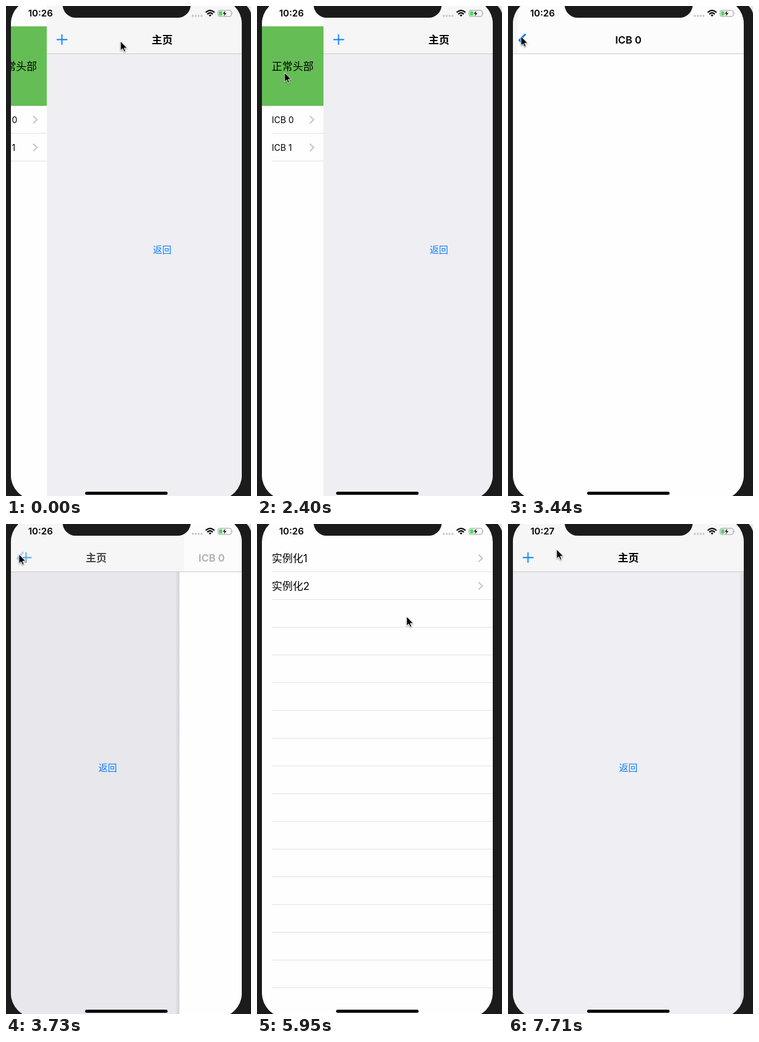
Write an HTML page that moves like this. It is 398x795 px and loops after 8000 ms.

```html
<!DOCTYPE html>
<html lang="zh-CN">
<head>
<meta charset="utf-8">
<title>Drawer navigation</title>
<style>
@property --drawer { syntax: "<number>"; inherits: true; initial-value: 0; }
@property --push { syntax: "<number>"; inherits: true; initial-value: 0; }
@property --title { syntax: "<number>"; inherits: true; initial-value: 0; }
html, body { margin: 0; width: 100%; height: 100%; overflow: hidden; background: #1b1b1b; }
svg { display: block; width: 398px; height: 795px; }
text { font: 17px Inter, "Noto Sans CJK SC", "Noto Sans CJK", sans-serif; fill: #000; }
.heading { font-weight: 600; text-anchor: middle; }
.latin { font-size: 16.5px; }
.small { font-size: 14px; }
.action { font-size: 15px; text-anchor: middle; fill: #0a7fff; }
.clock { font-size: 15px; font-weight: 600; text-anchor: middle; }
.line { fill: none; stroke: #e2e2e4; }
.arrow { fill: none; stroke: #c5c5c8; stroke-width: 2; }
.blue { fill: none; stroke: #0a7fff; }

#modal { animation: drawer 8s infinite, push 8s infinite, present 8s infinite; }
#nav { transform: translateX(calc(var(--drawer) * 1px)); }
#under { transform: translateX(calc(var(--push) * -112px)); }
#dim { opacity: calc(var(--push) * .1); }
#page { transform: translateX(calc((1 - var(--push)) * 375px)); }
#homeTitle { transform: translateX(calc(var(--title) * -160px)); }
#pageTitle { transform: translateX(calc((1 - var(--title)) * 200px)); }
.leaving { opacity: calc(1 - var(--title)); }
.entering { opacity: var(--title); }
#selected { animation: selected 8s infinite step-end; }
.before { animation: before 8s infinite step-end; }
.after { animation: after 8s infinite step-end; }
#cursor { animation: cursor 8s infinite ease-in-out; }

@keyframes drawer {
  0% { --drawer: 59; animation-timing-function: cubic-bezier(.2,.5,.5,1); }
  2.6%, 24.4% { --drawer: 0; animation-timing-function: ease-in-out; }
  27.8%, 35.7% { --drawer: 100; animation-timing-function: cubic-bezier(.4,0,.8,.7); }
  37.5% { --drawer: 46; animation-timing-function: cubic-bezier(.2,.4,.5,1); }
  39.3%, 100% { --drawer: 0; }
}
@keyframes push {
  0%, 35.7% { --push: 0; --title: 0; animation-timing-function: cubic-bezier(.4,0,.8,.8); }
  37.5% { --push: .709; --title: .662; animation-timing-function: cubic-bezier(.1,.5,.3,1); }
  41%, 44.8% { --push: 1; --title: 1; animation-timing-function: cubic-bezier(.4,0,.8,.8); }
  46.625% { --push: .275; --title: .3125; animation-timing-function: cubic-bezier(.1,.5,.3,1); }
  50%, 100% { --push: 0; --title: 0; }
}
@keyframes present {
  0%, 60% { transform: none; animation-timing-function: cubic-bezier(.3,.6,.2,1); }
  65.6%, 78.1% { transform: translateY(812px); animation-timing-function: cubic-bezier(.3,.6,.2,1); }
  84%, 100% { transform: none; }
}
@keyframes selected { 0% { opacity: 0; } 35% { opacity: 1; } 40%, 100% { opacity: 0; } }
@keyframes before { 0% { opacity: 1; } 90%, 100% { opacity: 0; } }
@keyframes after { 0% { opacity: 0; } 90%, 100% { opacity: 1; } }
@keyframes cursor {
  0%, 10.8% { transform: translate(186px, 57px); }
  18.75% { transform: translate(71px, 65px); }
  22.5%, 27.5% { transform: translate(25px, 47px); }
  33%, 38% { transform: translate(71px, 190px); }
  42.5%, 46.7% { transform: translate(21px, 49px); animation-timing-function: ease-in; }
  50.375% { transform: translate(66px, 171px); animation-timing-function: ease-out; }
  54%, 64% { transform: translate(180px, 371px); }
  74.375% { transform: translate(243px, 150px); }
  77%, 86% { transform: translate(253px, 105px); }
  95.6%, 100% { transform: translate(79px, 41px); }
}
</style>
</head>
<body>
<svg viewBox="0 0 398 795">
  <defs>
    <clipPath id="screen"><rect x="8" y="-11" width="375" height="812" rx="40"/></clipPath>
    <linearGradient id="shade"><stop stop-opacity="0"/><stop offset="1" stop-opacity=".1"/></linearGradient>
    <path id="chevron" class="arrow" d="M0 0l6 6-6 6"/>
  </defs>
  <rect width="398" height="795" fill="#1b1b1b"/>
  <path d="M391 0Q396 5 398 12V0Z" fill="#e6e6e6"/>

  <g clip-path="url(#screen)">
    <rect y="-11" width="398" height="812" fill="#fefefe"/>
    <g id="rows"></g>
    <text x="24" y="61.5">实例化1</text>
    <text x="24" y="106.5">实例化2</text>
    <use href="#chevron" x="360" y="49.5"/>
    <use href="#chevron" x="360" y="94.5"/>

    <g id="modal"><g id="nav">
      <g id="under">
        <rect x="8" y="-11" width="487" height="812" fill="#eeeef3"/>
        <text class="action" x="195.5" y="400.5">返回</text>
      </g>
      <rect id="dim" x="8" y="-11" width="375" height="812"/>
      <rect x="8" y="-11" width="375" height="88" fill="#f6f6f7"/>
      <g id="page">
        <rect x="1" y="78" width="7" height="723" fill="url(#shade)"/>
        <rect x="8" y="77" width="375" height="724" fill="#fefefe"/>
        <rect x="16" y="-11" width="367" height="88" fill="#fcfcfd"/>
      </g>
      <path class="line" d="M8 77.5H383" style="stroke:#c9c9cb"/>
      <path class="blue leaving" d="M24 54.5H41.5M32.5 46V63" stroke-width="1.8"/>
      <text id="homeTitle" class="heading leaving" x="195.5" y="61">主页</text>
      <path class="blue entering" d="M28.5 45.5L18.5 55.5L28.5 65.5" stroke-width="3"/>
      <text id="pageTitle" class="heading latin entering" x="195.5" y="61">ICB 0</text>

      <rect x="-92" y="-11" width="100" height="812" fill="#fefefe"/>
      <rect x="-92" y="33" width="100" height="129" fill="#65be55"/>
      <text x="-76" y="103.5">正常头部</text>
      <rect id="selected" x="-92" y="162" width="100" height="45" fill="#d9d9da"/>
      <path class="line" d="M-76 206.5H8M-76 251.5H8"/>
      <text class="small" x="-76" y="189.5">ICB 0</text>
      <text class="small" x="-76" y="234.5">ICB 1</text>
      <use href="#chevron" x="-14" y="178.5"/>
      <use href="#chevron" x="-14" y="223.5"/>
    </g></g>

    <text class="clock before" x="56" y="17.3">10:26</text>
    <text class="clock after" x="56" y="17.3">10:27</text>
    <path d="M303.5 16H318" stroke="#c6c6c8" stroke-width="3.4" stroke-linecap="round" stroke-dasharray="0 4.7"/>
    <g fill="none" stroke="#000" stroke-width="2.2">
      <path d="M324.4 10.4Q331.5 4 338.6 10.4M327 13.2Q331.5 9.2 336 13.2"/>
      <path d="M331.5 17.2L329.2 14.8Q331.5 13 333.8 14.8Z" fill="#000" stroke="none"/>
    </g>
    <rect x="344.5" y="7" width="21.5" height="10" rx="2.7" fill="none" stroke="#98989b"/>
    <rect x="346" y="8.5" width="5.5" height="7" rx="1.2" fill="#4cd964"/>
    <path d="M367.5 10.2Q369.2 12 367.5 13.8Z" fill="#98989b"/>
    <path d="M356.8 6.8L351.5 12.8H354.5L353.2 17.4L358.7 11.2H355.6Z" stroke="#fff" stroke-width=".6"/>
    <rect x="128.5" y="788" width="134" height="5" rx="2.5"/>
  </g>
  <rect x="92" y="-25" width="208" height="44" rx="21" fill="#1b1b1b"/>
  <path id="cursor" d="M0 0V15.3L3.5 12.1L6 17.4L8.3 16.3L6 11.2H10.8Z" stroke="#fff" stroke-width="1"
    style="filter:drop-shadow(0 1px 1px #0006)"/>
</svg>
<script>
  const lines = Array.from({ length: 16 }, (_, i) => `M24 ${77.5 + i * 45}H383`).join("");
  document.getElementById("rows").innerHTML = `<path class="line" d="${lines}"/>`;
</script>
</body>
</html>
```
